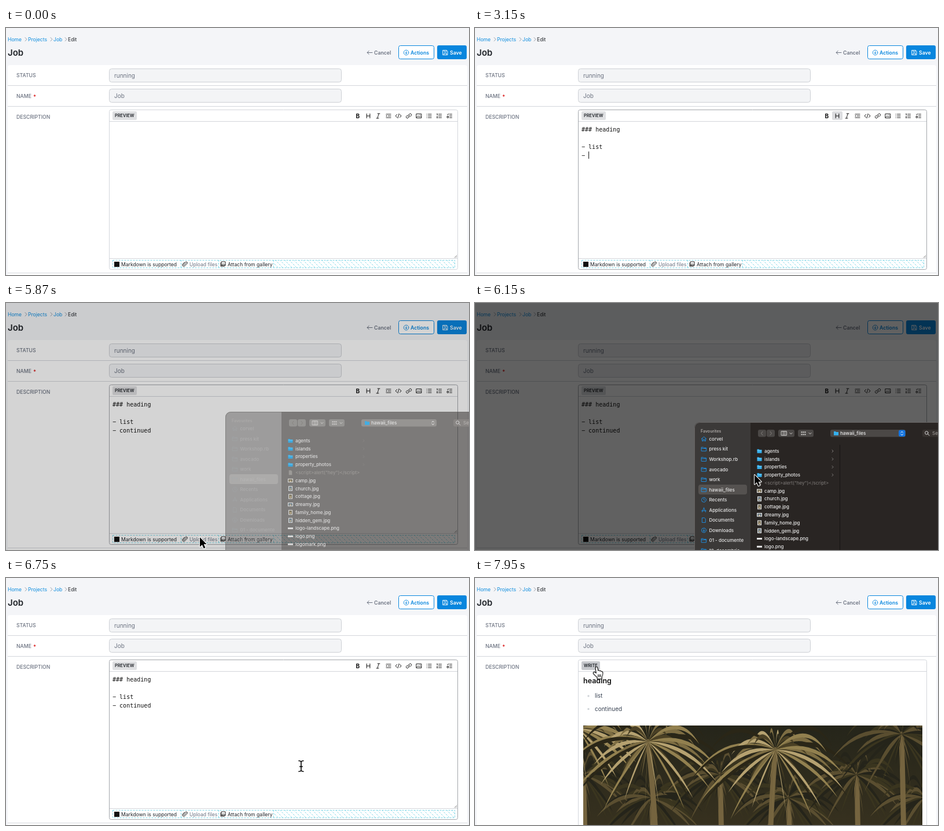
These frames come from a looping animation (800 by 427 pixels, 7990 ms). An HTML page with a canvas:

```html
<!DOCTYPE html>
<html lang="en">
<head>
<meta charset="utf-8">
<title>Editor demo</title>
<style>
  html, body { margin: 0; width: 100%; height: 100%; overflow: hidden; background: #f4f5f8; }
  canvas { display: block; width: 800px; height: 427px; }
</style>
</head>
<body>
<canvas id="stage"></canvas>
<script>
const LOOP = 7990, W = 800, H = 427;
const canvas = document.getElementById("stage");
const ctx = canvas.getContext("2d");
const ratio = window.devicePixelRatio || 1;
canvas.width = W * ratio;
canvas.height = H * ratio;

const BLUE = "#0886de", INK = "#1f2328", MUTED = "#6b7280", LINE = "#d3d6db";
const MONO = "'DejaVu Sans Mono', monospace", MONO_SIZE = 10.04, CHAR = 6.04;
const PREVIEW_AT = 7750, OPEN_AT = 5790, CLOSE_AT = 6590, SELECT_AT = 6400;

const clamp = v => Math.max(0, Math.min(1, v));
const span = (t, a, b) => clamp((t - a) / (b - a));
const mix = (a, b, k) => a + (b - a) * k;
const ease = k => k * k * (3 - 2 * k);

// y is the middle of the capital letters
function text(str, x, y, size = 8.7, color = INK, weight = 400, family = "Inter, sans-serif") {
  ctx.font = `${weight} ${size}px ${family}`;
  ctx.fillStyle = color;
  ctx.fillText(str, x, y + size * 0.36);
}

function box(x, y, w, h, r, fill, stroke) {
  ctx.beginPath();
  ctx.roundRect(x, y, w, h, r);
  if (fill) { ctx.fillStyle = fill; ctx.fill(); }
  if (stroke) { ctx.strokeStyle = stroke; ctx.lineWidth = 1; ctx.stroke(); }
}

function path(d, x, y, color, width = 1, fill) {
  const shape = new Path2D(d);
  ctx.save();
  ctx.translate(x, y);
  ctx.lineCap = ctx.lineJoin = "round";
  if (color) { ctx.strokeStyle = color; ctx.lineWidth = width; ctx.stroke(shape); }
  if (fill) { ctx.fillStyle = fill; ctx.fill(shape); }
  ctx.restore();
}

function rule(x, y, w, h, color) {
  ctx.fillStyle = color;
  ctx.fillRect(x, y, w, h);
}

// ---- page ----
function drawPage() {
  rule(0, 0, W, H, "#f4f5f8");
  [["Home", 3], ["Projects", 38], ["Job", 82]].forEach(([s, x]) => text(s, x, 19.5, 8.6, "#0d8ddf"));
  text("Edit", 107, 19.5, 8.6);
  [34, 78, 103].forEach(x => path("M-1 -3L2 0L-1 3", x, 19.5, "#7d8590", 0.8));
  text("Job", 3, 42.5, 15, INK, 600);

  path("M9 0H0M3.2 -3L0 0L3.2 3", 624, 42.5, MUTED, 1);
  text("Cancel", 636, 42.5, 8.7, MUTED, 600);
  box(678.5, 30.5, 61, 23, 3, "#fff", BLUE);
  path("M4.3 0A4.3 4.3 0 1 1 -4.3 0A4.3 4.3 0 1 1 4.3 0M0 -2V2M-1.8 .3L0 2.1L1.8 .3", 691.5, 42.5, BLUE, 0.9);
  text("Actions", 699, 42.5, 8.7, BLUE, 600);
  box(745, 30, 51, 24, 3, BLUE);
  path("M-4 -4H2.3L4 -2.3V4H-4ZM-2 -4V-1.5H1.8V-4M-2.2 4V1H2.2V4", 759, 42.5, "#fff", 0.9);
  text("Save", 767, 42.5, 8.7, "#fff", 600);

  box(3, 64, 794, 380, 4, "#fff");
  rule(3, 99, 794, 1, LINE);
  rule(3, 135, 794, 1, LINE);
  text("STATUS", 18, 82, 8.7, MUTED, 500);
  text("NAME", 18, 118, 8.7, MUTED, 500);
  text("*", 47, 119, 9.5, "#dc2626", 600);
  text("DESCRIPTION", 18, 153.5, 8.7, MUTED, 500);
  [["running", 70.5], ["Job", 105.5]].forEach(([s, y]) => {
    box(178.5, y, 401, 23, 4, "#f3f4f6", "#cdd0d5");
    text(s, 187, y + 11.5, 10, MUTED);
  });
}

const ICONS = [
  [643, "M-1 -4H3M-3 4H1M1.2 -4L-1.2 4"],
  [661, "M-4 -3H4M-1 0H4M-4 3H4M-4 -1L-3 0L-4 1"],
  [678, "M-2.3 -2.6L-5 0L-2.3 2.6M2.3 -2.6L5 0L2.3 2.6M1 -3.8L-1 3.8"],
  [696, "M-.9 1.6A2.2 2.2 0 0 1 -.9 -1.4L1 -3.3A2.1 2.1 0 0 1 4 -.3L2.8 .9M.9 -1.6A2.2 2.2 0 0 1 .9 1.4L-1 3.3A2.1 2.1 0 0 1 -4 .3L-2.8 -.9"],
  [713.5, "M-4.3 -3.5H4.3V3.5H-4.3ZM-4 2.2L-1.5 -.2L.5 1.6L2 .2L4.2 2.2M1.8 -1.6H2"],
  [731, "M-1.5 -3H4M-1.5 0H4M-1.5 3H4M-4 -3H-3.7M-4 0H-3.7M-4 3H-3.7"],
  [748.5, "M-1 -3H4M-1 0H4M-1 3H4M-4 -3.5L-3.3 -4V-1.4M-4.1 1H-2.9L-4.1 3.4H-2.8"],
  [766.5, "M0 -3H4M0 0H4M0 3H4M-4 -2.8L-3 -1.8L-1.6 -3.8M-4 .5H-2V3.2H-4Z"]
];

function drawToolbar(t) {
  if (t > 1130 && t < 5190) box(617, 144, 18, 15, 2, "#dcdde0");
  text("B", 604.5, 152, 10, "#111", 700);
  path("M-2.8 -3.7V3.7M2.8 -3.7V3.7M-2.8 0H2.8", 626, 152, "#111", 1);
  ICONS.forEach(([x, d]) => path(d, x, 152, "#222", 1));
}

function drawFooter() {
  rule(179, 398, 601, 1, LINE);
  ctx.save();
  ctx.setLineDash([3, 2]);
  ctx.strokeStyle = "#7fd6e6";
  ctx.lineWidth = 1;
  ctx.strokeRect(184.5, 401.5, 591, 13);
  [302.5, 367.5, 462.5].forEach(x => {
    ctx.beginPath(); ctx.moveTo(x, 401); ctx.lineTo(x, 415); ctx.stroke();
  });
  ctx.beginPath();
  ctx.rect(463, 402, 312, 12);
  ctx.clip();
  ctx.beginPath();
  for (let x = 449; x < 776; x += 8) { ctx.moveTo(x, 401); ctx.lineTo(x + 14, 415); }
  ctx.stroke();
  ctx.restore();
  rule(187, 404, 9, 9, "#111");
  text("Markdown is supported", 199, 408.5, 8.6);
  path("M3 -2.2L-1.2 2.2A1 1 0 0 1 -2.6 .8L1 -3.2A1.9 1.9 0 0 1 3.9 -.5L-.6 4A2.6 2.6 0 0 1 -4 .4L-.5 -3.1", 309, 408, "#333", 1);
  text("Upload files", 317, 408.5, 8.6, MUTED);
  path("M-2.5 -4H4V2.5H-2.5ZM-4 -2V4H2.5M-2 1.8L0 -.4L1.4 1L2.4 .2L4 1.8", 375, 408, "#222", 1);
  text("Attach from gallery", 383, 408.5, 8.6);
}

// ---- typing: [first key, last key, characters] ----
const IMAGE_TEXT = "![camp.jpg]\n" +
  "(/media/static_storage/blobs/redirect/eyJfbmV3cyIOnsiZGF0YSI6MTE3NSwicHVyIjoiYmxvYl9pZCJ9fQAB==-\n" +
  "-5417ef835d2beb79f81946dda0c3a42de8d65fe4/camp.jpg)";
const TYPING = [
  [1340, 1340, "### "], [1640, 1680, "he"], [1820, 2110, "ading\n"], [2290, 2290, "\n"],
  [2520, 2600, "- "], [2780, 3110, "list\n- "], [3180, 3520, "conti"], [3660, 3900, "nued"],
  [4240, 4240, "\n"], [4970, 4970, "\n"], [6950, 6950, IMAGE_TEXT]
];

function typedText(t) {
  return TYPING.map(([a, b, s]) => {
    if (t < a) return "";
    return a === b ? s : s.slice(0, 1 + Math.floor(span(t, a, b) * (s.length - 1)));
  }).join("");
}

function drawWrite(t) {
  box(178.5, 141.5, 602, 276, 3, "#fff", t > 1340 ? "#a3a6ab" : LINE);
  rule(179, 161, 601, 1, LINE);
  box(184, 144, 42, 15, 2, t > 7640 ? "#c6c8cc" : "#dfe0e2");
  text("PREVIEW", 188, 151.8, 7.4, INK, 600);
  drawToolbar(t);
  drawFooter();
  path("M0 4L4 0M2.3 4L4 2.3", 775, 393, "#777", 0.8);
  const lines = typedText(t).split("\n");
  // The minus sign gives the editor's wide hyphen.
  lines.forEach((s, i) => text(s.replaceAll("-", "\u2212"), 184, 175 + 15 * i, MONO_SIZE, "#111", 400, MONO));
  if (t > 1340 && t < 5640) {
    const row = lines.length - 1;
    rule(184 + lines[row].length * CHAR, 168.5 + 15 * row, 1, 12.5, "#111");
  }
  rule(3, 423, 794, 1, LINE);
}

// ---- holiday picture, laid out on 586 x 440 ----
const LIGHT = ["#7d6d43", "#4a4025", "#b5a170", "#2a2617", "#92804f"];
const SHADE = ["#3a351f", "#25241a", "#5a4e30"];

function palm(x, y, size, tones, lean) {
  path(`M${x} ${y}Q${x + lean} 190 ${x + lean} 370`, 0, 0, "#75643f", 9);
  for (let i = 0; i < 44; i++) {
    const a = i * 2.4, r = size * (0.7 + 0.3 * Math.sin(i * 5));
    const dx = Math.cos(a) * r, dy = Math.sin(a) * r * 0.6;
    const ex = x + dx, ey = y + dy + r * 0.4;
    const mx = x + dx * 0.6, my = y + dy - r * 0.12;
    path(`M${x} ${y}Q${mx} ${my - 5} ${ex} ${ey}Q${mx} ${my + 9} ${x} ${y}`, 0, 0, null, 0, tones[i % tones.length]);
  }
}

function drawPhoto(x, y, w) {
  const k = w / 586;
  ctx.save();
  ctx.beginPath();
  ctx.rect(x, y, w, 440 * k);
  ctx.clip();
  ctx.translate(x, y);
  ctx.scale(k, k);
  const g = ctx.createLinearGradient(0, 0, 0, 440);
  [[0, "#25251a"], [0.4, "#37311f"], [0.68, "#5d4a30"], [0.76, "#b09a7b"], [1, "#cdbca0"]]
    .forEach(([p, c]) => g.addColorStop(p, c));
  rule(0, 0, 586, 440, g);
  rule(70, 248, 390, 85, "#4a3321");
  path("M40 252L120 195H410L490 252Z", 0, 0, null, 0, "#997451");
  for (let i = 0; i < 8; i++) rule(84 + i * 47, 265, 24, 52, i % 2 ? "#806044" : "#261d15");
  for (let i = 0; i < 6; i++) palm(i * 118, 85 + (i % 2) * 40, 95, SHADE, 4);
  palm(-10, 5, 125, LIGHT, 12);
  palm(112, 28, 145, LIGHT, 18);
  palm(332, 42, 145, LIGHT, -12);
  palm(550, 15, 120, SHADE, 5);
  ctx.restore();
}

function drawPreview() {
  box(178.5, 141.5, 602, 320, 3, "#fff", LINE);
  rule(179, 161, 601, 1, LINE);
  box(184, 144, 32, 15, 2, "#c6c8cc");
  text("WRITE", 188, 151.8, 7.4, INK, 600);
  text("heading", 187, 177.5, 12.5, "#111", 600);
  [["list", 203.5], ["continued", 226]].forEach(([s, y]) => {
    ctx.fillStyle = "#cfd3d8";
    ctx.beginPath();
    ctx.arc(196, y + 0.5, 1.7, 0, 7);
    ctx.fill();
    text(s, 207, y, 10, "#374151");
  });
  drawPhoto(187, 255, 586);
}

// ---- file dialog ----
const PLACES = ["corvel", "press kit", "Workshop.rb", "avocado", "work", "hawaii_files", "Recents",
  "Applications", "Documents", "Downloads", "01 - documente", "10-decembrie"];
const FILES = ["agents", "islands", "properties", "property_photos", "<script>alert(\"hey\")<\/script>",
  "camp.jpg", "church.jpg", "cottage.jpg", "dreamy.jpg", "family_home.jpg", "hidden_gem.jpg",
  "logo-landscape.png", "logo.png", "logomark.png"];
const FOLDER = "M-4 -3.2H-1L0 -2.2H4V3.4H-4Z";
const PAGE = "M-2.8 -4H1L2.8 -2.2V4H-2.8Z";
const DISC = "M4 0A4 4 0 1 1 -4 0A4 4 0 1 1 4 0";
const PLACE_ICONS = {
  0: "M-4.2 0L0 -3.8L4.2 0M-3 -1V3.6H-1V.8H1V3.6H3V-1",
  6: DISC + "M0 -2.3V0L1.5 1",
  7: "M0 -3.8L-3 3.5M0 -3.8L3 3.5M-4 1.2H4",
  8: PAGE,
  9: DISC + "M0 -2V2M-1.7 .4L0 2.1L1.7 .4"
};

// Colours while the dialog takes input, and while it fades in or out.
const ACTIVE = { accent: "#1d95ee", side: "#e9e9e9", place: "#555250", key: "#4b4846", glyph: "#d5d3d1",
  arrow: "#85817e", row: "#0a58c9", off: "#74706e", search: "#37322f", hint: "#aaa6a3" };
const FADING = { accent: "#a5abb0", side: "#c4c4c4", place: "#c2c0be", key: "#9a9896", glyph: "#dad8d6",
  arrow: "#85817e", row: "#92908e", off: "#a19e9b", search: "#8b8886", hint: "#c0bebc" };

function drawFile(name, i, look) {
  const y = 256 + 13.77 * i;
  if (i < 4) {
    path(FOLDER, 491.5, y, null, 0, "#35b0ee");
    rule(487.5, y - 1.3, 8, 0.7, "#8ad6fa");
    path("M-1 -2L1 0L-1 2", 618, y, "#8b8886", 0.9);
  } else if (i === 4) {
    path(PAGE, 491.5, y, null, 0, look.off);
  } else if (i > 10) {
    rule(487, y - 1.5, 9, 3, "#e8e8e8");
  } else {
    const wide = i === 5 || i === 8;
    const w = wide ? 9 : 7, h = wide ? 6.5 : 8.5;
    rule(491.5 - w / 2, y - h / 2, w, h, "#eee");
    rule(492.5 - w / 2, y - h / 2 + 1, w - 2, h - 2, i % 2 ? "#77705b" : "#6c7b84");
    rule(490.3, y, 2.5, 2, "#d8c29d");
  }
  text(name, 500, y, 7.9, i === 4 ? look.off : "#ececec", 500);
}

function drawPlaces(look) {
  text("Favourites", 390, 221, 7, look.hint, 600);
  box(386, 314, 84, 17, 4, look.place);
  PLACES.forEach((s, i) => {
    const y = 235 + 17.55 * i;
    path(PLACE_ICONS[i] || FOLDER + "M-4 -1H4", 395.5, y, look.accent, 0.9);
    text(s, 404.5, y, 8, look.side, 500);
  });
}

function drawControls(look, active) {
  [[489, 14], [504, 14], [524, 28], [558, 27], [614, 130]].forEach(([x, w]) => box(x, 219, w, 12.5, 3, look.key));
  path("M1 -3L-1.5 0L1 3", 496, 225.3, look.arrow, 1);
  path("M-1 -3L1.5 0L-1 3", 511, 225.3, look.arrow, 1);
  path("M-4.5 -3.5H4.5V3.5H-4.5ZM-1.5 -3.5V3.5M1.5 -3.5V3.5", 534, 225.3, look.glyph, 1);
  [-3, 0, 3].forEach(dx => [-2, 2].forEach(dy => rule(566.5 + dx, 224.3 + dy, 2, 2, look.glyph)));
  [546, 579].forEach(x => path("M-2 -1L0 1L2 -1", x, 225.5, look.glyph, 1));
  path(FOLDER, 624, 225.3, null, 0, "#35b0ee");
  text("hawaii_files", 631, 225.3, 8, "#eee", 500);
  if (active) box(732, 219.5, 11.5, 11.5, 3, "#1474df");
  path("M-1.8 -1.3L0 -3.2L1.8 -1.3M-1.8 1.3L0 3.2L1.8 1.3", 737.7, 225.3, "#fff", 1);
  box(773, 219, 90, 12.5, 3, look.search);
  path("M2 -.5A2.7 2.7 0 1 1 -3.4 -.5A2.7 2.7 0 1 1 2 -.5M1.4 1.5L4 4", 781, 225, "#ddd", 1);
  text("Search", 790, 225.3, 8, look.hint);
}

function drawBrowser(t, look, active) {
  const selected = t >= SELECT_AT;
  if (selected) box(483, 318, 141, 13.5, 3, look.row);
  FILES.forEach((name, i) => drawFile(name, i, look));
  if (selected) {
    drawPhoto(659, 251, 172);
    text("camp.jpg", 637, 403.5, 9.6, "#f0f0f0", 600);
    text("JPEG image - 2.2 MB", 637, 416.5, 8.2, "#c4c0bd");
    text("Information", 637, 431, 8, "#eee", 600);
  } else if (active) {
    rule(630, 245, 1, 250, "#161413");
  }
}

function drawDialog(t) {
  const opening = t < SELECT_AT;
  const shown = opening ? span(t, OPEN_AT, 5950) : 1 - span(t, CLOSE_AT, 6750);
  if (!shown) return;
  const dim = opening ? span(t, OPEN_AT, 6090) : 1 - span(t, CLOSE_AT, 6725);
  const lift = opening ? 24 * (1 - span(t, OPEN_AT, 6110)) : 20 * span(t, CLOSE_AT, 6750);
  const active = shown === 1;
  const look = active ? ACTIVE : FADING;

  rule(0, 0, W, H, `rgba(0,0,0,${0.62 * dim})`);
  ctx.save();
  ctx.translate(0, -lift);
  // The glassy sidebar fades later than the panel, the file list sooner.
  ctx.globalAlpha = shown ** 1.5;
  box(379, 206, 97, 300, [9, 0, 0, 0], "#3b3938");
  ctx.globalAlpha = shown;
  rule(476, 206, 400, 300, "#292523");
  box(379.5, 206.5, 500, 300, 9, null, "#666362");
  ctx.globalAlpha = active ? 1 : shown * 0.8;
  drawPlaces(look);
  ctx.globalAlpha = 1 - (1 - shown) ** 3;
  drawControls(look, active);
  drawBrowser(t, look, active);
  ctx.restore();
}

// ---- pointer: [time, x, y, shape until the next entry] ----
const TRACK = [
  [540, 590, 440, "arrow"], [900, 605, 300, "beam"], [1130, 626, 153, "hand"], [1640, 626, 153, ""],
  [5150, 626, 153, "beam"], [5600, 335, 405, "hand"], [OPEN_AT, 335, 405, "arrow"],
  [5890, 335, 405, "arrow"], [6150, 483, 297, "arrow"], [6360, 513, 327, "arrow"],
  [CLOSE_AT, 513, 327, "hand"], [6710, 513, 327, "beam"], [7300, 288, 186, "beam"],
  [7420, 288, 186, "beam"], [7640, 207, 154, "hand"], [LOOP, 207, 154, "hand"]
];
const ARROW = "M0 0V16.5L3.9 13L6.7 19.3L9.4 18.1L6.7 12H11.7Z";
const HAND = "M2.6 2C2.3 -.4 5 -.7 5.4 1.5L6.5 7.2C7 5.8 9 6 9.3 7.5C10 6.5 11.8 6.9 12 8.2" +
  "C13.2 7.6 14.4 8.5 14.4 10C14.5 14 13.8 15.5 12.6 17.3V20H5.6V17.6C3.6 15.8 1.2 13.6 -1 11.2" +
  "C-2 9.6 -.3 8.2 1.3 9.4L4 11.2Z";
const BEAM = "M-4 -9Q-1 -9 0 -7.3Q1 -9 4 -9M0 -7.3V7.8M-4 9.5Q-1 9.5 0 7.8Q1 9.5 4 9.5M-2.3 1H2.3";

function drawPointer(t) {
  const i = TRACK.findLastIndex(k => t >= k[0]);
  if (i < 0 || i === TRACK.length - 1) return;
  const [t0, x0, y0, shape] = TRACK[i], [t1, x1, y1] = TRACK[i + 1];
  const k = ease(span(t, t0, t1));
  const x = mix(x0, x1, k), y = mix(y0, y1, k);
  if (shape === "arrow") path(ARROW, x, y, "#fff", 2, "#000");
  if (shape === "hand") {
    path(HAND, x - 1, y, "#000", 2.2, "#fff");
    path("M6.8 13V17M9 13V17M11.2 13V17", x - 1, y, "#000", 1);
  }
  if (shape === "beam") {
    path(BEAM, x, y, "#fff", 3);
    path(BEAM, x, y, "#000", 1.6);
  }
}

function render(t) {
  ctx.setTransform(ratio, 0, 0, ratio, 0, 0);
  drawPage();
  if (t < PREVIEW_AT) drawWrite(t);
  else drawPreview();
  drawDialog(t);
  drawPointer(t);
}

const start = performance.now();
function tick() {
  render((performance.now() - start) % LOOP);
  requestAnimationFrame(tick);
}
tick();
</script>
</body>
</html>
```
